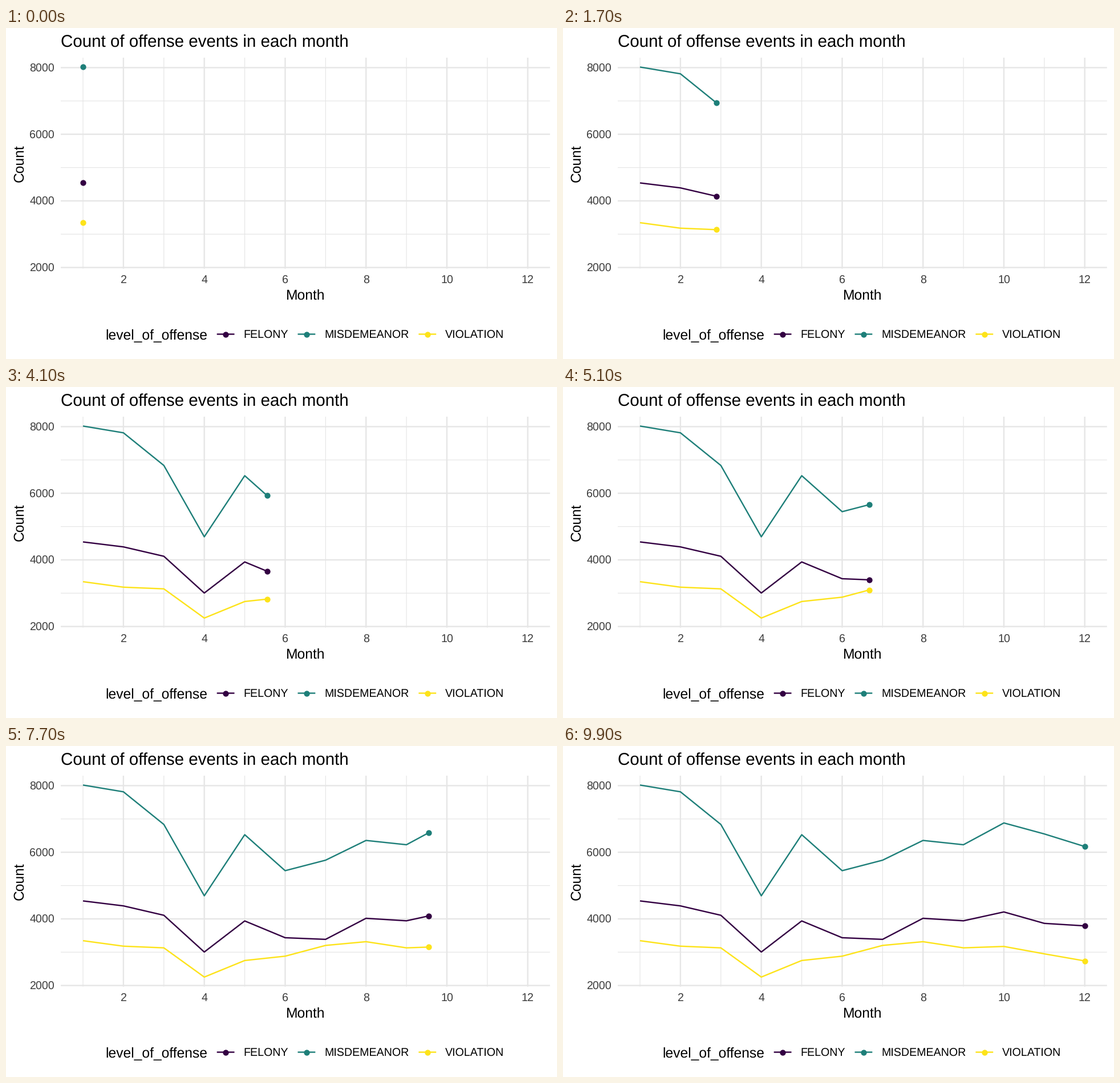
Write a matplotlib script that moves like this. It is 966 px wide and 580 px high and loops after 10 s.

```python
import numpy as np
import matplotlib.pyplot as plt
from matplotlib.animation import FuncAnimation

W, H, DPI = 966, 580, 64
FRAMES, INTERVAL = 100, 100
PT = 72 / DPI  # points per pixel

plt.rcParams["font.family"] = "Liberation Sans"
plt.rcParams["text.hinting"] = "none"

GRID, TICK = "#e6e6e6", "#3c3c3c"
LINE, DOT = 2.4 * PT, 10.3 * PT
TITLE, LABEL, SMALL = 29.5, 24.6, 19.68

MONTHS = np.arange(1, 13)
SERIES = [
    ("FELONY", "#330042",
     [4539, 4390, 4108, 3005, 3938, 3434, 3385, 4017, 3942, 4208, 3865, 3790]),
    ("MISDEMEANOR", "#1e7f79",
     [8018, 7815, 6835, 4693, 6528, 5447, 5762, 6355, 6226, 6880, 6550, 6172]),
    ("VIOLATION", "#fde31a",
     [3345, 3180, 3130, 2253, 2750, 2880, 3203, 3315, 3130, 3172, 2950, 2738]),
]

LEFT, RIGHT, TOP, BOTTOM = 96, 953.7, 51.6, 421.7
X0, X1, Y0, Y1 = 0.45, 12.55, 1964.75, 8306.25

fig = plt.figure(figsize=(W / DPI, H / DPI), dpi=DPI, facecolor="white")

page = fig.add_axes([0, 0, 1, 1])
page.set(xlim=(0, W), ylim=(H, 0))
page.axis("off")

panel = fig.add_axes([LEFT / W, 1 - BOTTOM / H,
                      (RIGHT - LEFT) / W, (BOTTOM - TOP) / H])
panel.set(xlim=(X0, X1), ylim=(Y0, Y1))
panel.axis("off")


def px(month):
    return LEFT + (month - X0) / (X1 - X0) * (RIGHT - LEFT)


def py(count):
    return BOTTOM - (count - Y0) / (Y1 - Y0) * (BOTTOM - TOP)


def write(x, y, text, size, color="black", **kw):
    page.text(x, y, text, size=size * PT, color=color,
              ha="left", va="baseline", **kw)


def stroke(ax, xs, ys, color, width=LINE, **kw):
    return ax.plot(xs, ys, color=color, lw=width, snap=False,
                   solid_capstyle="butt", solid_joinstyle="round", **kw)[0]


def dot(ax, x, y, color, **kw):
    return ax.plot([x], [y], "o", color=color, ms=DOT, mew=0,
                   snap=False, **kw)[0]


def grid(months, counts, width):
    for c in counts:
        stroke(panel, [X0, X1], [c, c], GRID, width, zorder=1)
    for m in months:
        stroke(panel, [m, m], [Y0, Y1], GRID, width, zorder=1)


grid(range(1, 12, 2), range(3000, 8000, 2000), LINE / 2)
grid(range(2, 13, 2), range(2000, 8001, 2000), LINE)

# Axis labels and titles
DIGIT = 0.556 * SMALL
for m in range(2, 13, 2):
    write(px(m) - DIGIT * len(str(m)) / 2, 447.3, str(m), SMALL, TICK)
for c in range(2000, 8001, 2000):
    write(41.1, py(c) + 7.2, str(c), SMALL, TICK)
write(96, 34, "Count of offense events in each month", TITLE)
write(490.6, 475.5, "Month", LABEL)
write(30, 269.8, "Count", LABEL, rotation=90, rotation_mode="anchor")

# Legend
write(174, 546, "level_of_offense", LABEL)
for (name, color, _), x in zip(SERIES, (385.1, 526.9, 738.8)):
    stroke(page, [x - 15.4, x + 15.4], [536.5, 536.5], color)
    dot(page, x, 536.5, color)
    write(x + 31.6, 544, name, SMALL)

lines = [stroke(panel, [], [], c, zorder=3) for _, c, _ in SERIES]
dots = [dot(panel, 1, v[0], c, zorder=4, clip_on=False) for _, c, v in SERIES]


def update(i):
    now = 1 + 11 * i / (FRAMES - 1)
    past = MONTHS[MONTHS < now]
    for line, point, (_, _, counts) in zip(lines, dots, SERIES):
        xs = np.append(past, now)
        ys = np.interp(xs, MONTHS, counts)
        line.set_data(xs, ys)
        point.set_data([now], ys[-1:])
    return lines + dots


anim = FuncAnimation(fig, update, frames=FRAMES, interval=INTERVAL,
                     repeat=True, repeat_delay=0, blit=False)
plt.show()
```
